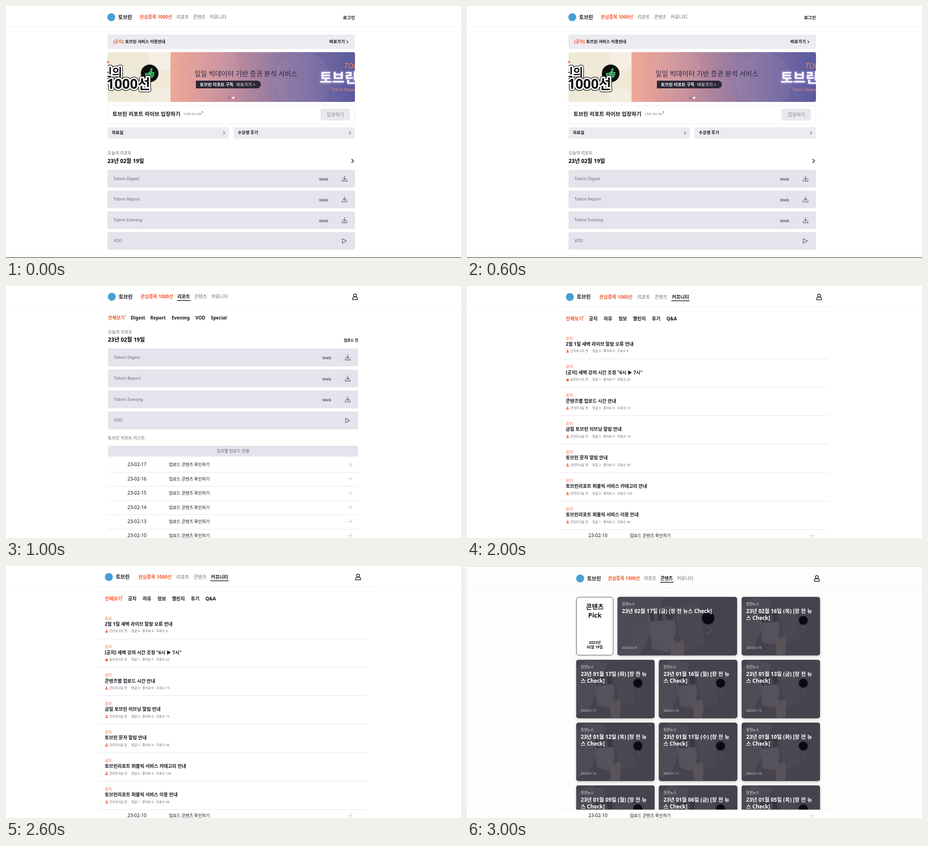
Write an HTML page that moves like this. It is 1004 by 557 pixels and loops after 4000 ms.

```html
<!DOCTYPE html>
<html lang="ko">
<head>
<meta charset="utf-8">
<title>토브린</title>
<style>
html, body { margin: 0; width: 100%; height: 100%; overflow: hidden; background: #fff; }
svg { display: block; width: 1004px; height: 557px; }
text { font-family: "Noto Sans", "Noto Sans CJK KR", "Noto Sans CJK JP", "Noto Sans CJK", sans-serif; white-space: pre; }
</style>
</head>
<body>
<svg id="stage" viewBox="0 0 1004 557" lang="ko"></svg>
<script>
const INK = '#14131e', GREY = '#6a6678', RED = '#f1592f', BAR = '#e5e4ec', PALE = '#ecebf1', RULE = '#e5e5ea';
const BRAND = '토브린', BRAND_EN = 'Tobrin';

// Text is placed by its left (or anchored) x and its vertical centre.
const text = (x, cy, str, size, color = INK, weight = 700, anchor = 'start', extra = '') =>
  `<text x="${x}" y="${(cy + size * 0.365).toFixed(2)}" font-size="${size}" fill="${color}" font-weight="${weight}" text-anchor="${anchor}" ${extra}>${str}</text>`;
const rect = (x, y, w, h, fill, r = 0, extra = '') =>
  `<rect x="${x}" y="${y}" width="${w}" height="${h}" rx="${r}" fill="${fill}" ${extra}/>`;
const circle = (x, y, r, fill, extra = '') => `<circle cx="${x}" cy="${y}" r="${r}" fill="${fill}" ${extra}/>`;
const stroke = (d, color, w = 1.2) =>
  `<path d="${d}" fill="none" stroke="${color}" stroke-width="${w}" stroke-linecap="round" stroke-linejoin="round"/>`;
const fill = (d, color, extra = '') => `<path d="${d}" fill="${color}" ${extra}/>`;
const rule = (x, y, w, color = RULE) => rect(x, y, w, 1, color);
const times = (n, fn) => Array.from({ length: n }, (_, i) => fn(i)).join('');

const chevron = (x, y, s, color = INK, w = 1.2) => stroke(`M${x} ${y - s}l${s} ${s}l${-s} ${s}`, color, w);
const download = (x, y) =>
  stroke(`M${x} ${y - 6}v8m-3.2 -3.2l3.2 3.2l3.2 -3.2M${x - 5.3} ${y + 2}v3.4h10.6v-3.4`, GREY, 1.4);
const play = (x, y) => stroke(`M${x - 4.2} ${y - 5}v10l9 -5z`, GREY, 1.4);
const arrow = (x, y) => stroke(`M${x} ${y}h9.5m-4 -4l4 4l-4 4`, '#cfcdd8', 1.1);
const person = (x, y) =>
  `<circle cx="${x}" cy="${y - 3.3}" r="3.2" fill="none" stroke="${INK}" stroke-width="1.4"/>` +
  stroke(`M${x - 5.5} ${y + 6}v-2q0 -3.6 3.6 -3.6h3.8q3.6 0 3.6 3.6v2z`, INK, 1.4);

function header(logoX, cy, xs, size, active) {
  const labels = ['관심종목 1000선', '리포트', '콘텐츠', '커뮤니티'];
  const nav = labels.map((s, i) =>
    text(xs[i], cy, s, size, i === 0 ? RED : i === active ? INK : GREY, i === 0 || i === active ? 700 : 500)).join('');
  const w = active === 3 ? 40 : 30;
  const line = active ? rect(xs[active] - 1, cy + 7.6, w, 1.5, INK) : '';
  return circle(logoX, cy, 8.8, '#479fd6') + text(logoX + 15.5, cy, BRAND, 11) + nav + line;
}

function reports(x, right, top, pitch, h, size) {
  const names = [BRAND_EN + ' Digest', BRAND_EN + ' Report', BRAND_EN + ' Evening', 'VOD'];
  return names.map((s, i) => {
    const y = top + i * pitch, mid = y + h / 2;
    const tools = i < 3
      ? text(right - 59, mid + 1, 'Web', size + 0.2, GREY, 600, 'end') +
        rect(right - 46.5, mid - 9, 1, 18, '#dbdae4') + download(right - 23, mid + 0.3)
      : play(right - 23.5, mid + 0.3);
    return rect(x, y, right - x, h, BAR, 3) + text(x + 13, mid - 0.3, s, size, GREY, 500) + tools;
  }).join('');
}

function banner() {
  const label = (x, y, s, size) => ['stroke="#111" stroke-width="9"', 'stroke="#fff" stroke-width="6.5"', '']
    .map(e => text(x, y, s, size, '#111', 900, 'start', e + ' stroke-linejoin="round"')).join('');
  return `<g clip-path="url(#banner)">` +
    rect(224, 102, 139, 110, '#efe9d8') +
    circle(345, 112, 30, '#f4efe2') + circle(340, 205, 26, '#f3eee0') +
    rect(363, 102, 407, 110, 'url(#dusk)') +
    circle(462, 142, 54, '#fff', 'opacity=".04"') + circle(655, 165, 62, '#fff', 'opacity=".04"') +
    fill('M223 119l5 5l-5 4z', RED) +
    circle(317, 149, 19.5, '#0d0f10') +
    fill('M307 148h5l5 -3l3 -8q4 0 3 4l-1 5h5q2 2 0 4q1 3 -1 4q0 3 -2 3q0 2 -3 2h-7l-2 -1h-5z', '#3fae6a') +
    stroke('M312 148v10M321 150h6M321 154h5', '#0d0f10', 0.8) +
    label(212, 146, '린의', 24) + label(222, 172.5, '1000선', 30) +
    text(416, 150, '일일 빅데이터 기반 증권 분석 서비스', 15, '#2a2640', 500) +
    fill('M419 165h135a8.5 8.5 0 0 1 0 17h-135z', '#2b2838') +
    text(428, 173.5, BRAND + ' 리포트 구독', 9.4, '#fff') +
    text(508, 173.5, '바로가기 &gt;', 9.3, '#fff', 400) +
    circle(492.5, 203, 2.1, '#77697c') + circle(501.5, 203, 2.4, '#fff') +
    text(692, 158, BRAND, 30, '#fff', 700, 'start', 'style="text-shadow:0 0 5px #d9c8ff"') +
    text(746, 132, 'TOB', 17, '#ef8058', 300, 'start', 'font-style="italic"') +
    text(718, 185, BRAND_EN + ' Report', 8.8, '#ee8c70', 400) + '</g>';
}

function home() {
  const link = (x, s) => rect(x, 268, 268, 25, PALE, 3) + text(x + 9.5, 280, s, 9.2) + chevron(x + 255.5, 280.5, 3.2, GREY);
  return rect(0, 0, 1004, 557, '#fff') + rule(0, 46, 1004, '#f1f1f3') +
    header(232.3, 24.7, [295, 376, 412.7, 449.3], 10, 0) + text(770, 25, '로그인', 9.6, INK, 700, 'end') +
    rect(224, 63, 546, 32, PALE, 3) +
    text(236.5, 79, '[공지]', 9.3, RED) + text(263, 79, BRAND + ' 서비스 이용안내', 9.1) +
    text(713.5, 79, '바로가기', 9.3) + chevron(752, 79.3, 2.6) +
    banner() +
    rect(224.5, 219.5, 545, 41.5, '#fff', 4, `stroke="${PALE}"`) +
    text(235, 238.5, BRAND + ' 리포트 라이브 입장하기', 11.75) +
    text(392, 238, 'LIVE On Air', 7.7, '#77738a', 400) + circle(433.5, 234.3, 1.1, INK) +
    rect(694, 227, 65, 26, '#e9e8ee', 3) + text(726.8, 240, '입장하기', 10.4, '#a9a6b5', 700, 'middle') +
    link(224, '자료실') + link(502, '수강생 후기') +
    text(224, 325, '오늘의 리포트', 9.2, GREY, 400) + text(224, 343, '23년 02월 19일', 12, '#000') +
    chevron(763, 342.3, 3.8, INK, 1.5) +
    reports(224, 770, 362, 45.85, 39.2, 9.1) + rect(0, 556, 1004, 1, '#111');
}

function reportPage() {
  const tabs = [['Digest', 275], ['Report', 318.5], ['Evening', 365.5], ['VOD', 418], ['Special', 452]];
  return rect(0, 0, 1004, 557, '#fff') + rule(0, 45, 1004, '#f1f1f3') +
    header(233.5, 23.7, [296.7, 378.3, 415.7, 453], 10.1, 1) + person(770.3, 24) +
    text(225, 70.5, '전체보기', 10, RED) + circle(263.3, 65.6, 1.1, RED) +
    tabs.map(([s, x]) => text(x, 70.5, s, 10)).join('') +
    text(225, 101.7, '오늘의 리포트', 9.3, GREY, 400) + text(225, 118.3, '23년 02월 19일', 12.15, '#000') +
    text(777, 120.3, '업로드 전', 8, INK, 700, 'end') +
    reports(225, 777, 138, 46.4, 39.7, 9.2) +
    text(225, 336, BRAND + ' 리포트 리스트', 9.25, GREY, 500) +
    rect(225, 353, 552, 24, BAR, 3) + text(501, 365, '일자별 업로드 현황', 9.2, GREY, 500, 'middle') +
    [17, 16, 15, 14, 13, 10].map((d, i) => {
      const y = 395 + i * 31.4;
      return text(268, y - 0.3, '23-02-' + d, 10.3, INK, 500) + text(359.5, y, '업로드 콘텐츠 확인하기', 9.25, INK, 500) +
        arrow(754, y) + rule(225, Math.round(y + 15.9), 552);
    }).join('');
}

function community() {
  const tabs = [['공지', 269], ['자유', 301.5], ['정보', 334], ['챌린지', 366], ['후기', 407.7], ['Q&amp;A', 440]];
  const posts = [
    ['2월 1일 새벽 라이브 알람 오류 안내', '2주', 0, 0, 8],
    ['[공지] 새벽 강의 시간 조정 "6시 ▶ 7시"', '3주', 1, 7, 22],
    ['콘텐츠별 업로드 시간 안내', '2달', 0, 0, 15],
    [`금일 ${BRAND} 이브닝 알림 안내`, '2달', 0, 0, 10],
    [`${BRAND} 문자 알림 안내`, '4달', 2, 0, 56],
    [`${BRAND}리포트 퍼블릭 서비스 카테고리 안내`, '5달', 0, 2, 120],
    [`${BRAND}리포트 퍼블릭 서비스 이용 안내`, '5달', 1, 2, 96]
  ];
  const badge = (y, vip) => vip
    ? fill(`M219 ${y - 1.5}l1.6 .8l1.4 -2.3l1.4 2.3l1.6 -.8l-.7 5h-4.6z`, RED)
    : circle(222, y - 1.6, 1.6, RED) + fill(`M219 ${y + 3.2}q0 -2.8 3 -2.8t3 2.8z`, RED);
  return rect(205, 15, 592, 524, '#fff') + rule(205, 46, 592, '#f1f1f3') +
    header(227, 24.3, [291.7, 375.7, 414, 452], 10.3, 3) + person(777, 24.5) +
    text(218, 72.5, '전체보기', 10.4, RED) + circle(257.3, 66.8, 1.1, RED) +
    tabs.map(([s, x]) => text(x, 72.5, s, 10.4)).join('') +
    posts.map(([title, age, notes, likes, views], i) => {
      const y = 115.5 + i * 62.95, meta = y + 28.2;
      return text(218, y, '공지', 8.3, RED, 400) + text(218, y + 12.4, title, 10.2) + badge(meta, i === 1) +
        text(228, meta, `${i === 1 ? '달무린' : '관리자'}·${age} 전`, 6.9, GREY, 400) +
        text(276.5, meta, `댓글 ${notes} · 좋아요 ${likes} · 조회수 ${views}`, 7, GREY, 400) +
        rule(205, Math.min(538, Math.round(y + 45)), 592);
    }).join('');
}

// Dimmed desk scene, centred on 0,0.
const desk = () =>
  rect(-96, -65, 192, 130, '#45434d') +
  fill('M-96 -40L-62 -65L-20 -56L-34 -12L-60 48L-96 60z', '#4d4b55') +
  fill('M-49 -28L-8 -32L-2 10L-14 42L-40 36z', '#53515b') +
  fill('M-4 -32L34 -40L44 30L10 40z', '#4a4852') +
  fill('M-46 -26L-8 -29L-6 -11L-42 -7z', '#393741') +
  fill('M-38 -24l6 -1l1 16l-6 1zM-24 -26l5 0l2 16l-6 1z', '#4b4953') +
  times(9, i => stroke(`M${-38 + i * 0.8} ${-2 + i * 4}l28 -3`, '#5c5a64', 0.8)) +
  times(9, i => stroke(`M${-62 - i * 2} ${2 + i * 5}l18 3`, '#575560', 0.8)) +
  times(6, i => stroke(`M4 ${-24 + i * 7}l26 -4`, '#504e58', 0.7)) +
  fill('M-9 65L-12 36Q-14 24 -8 21L0 27L8 22Q14 34 9 65z', '#5a545a') +
  stroke('M-6 24l3 10M1 26l1 9', '#4b464e', 0.8) +
  stroke('M49 0q7 3 3 9q-3 3 -6 1', '#57555f', 1.4) +
  circle(49.5, -12.9, 11, '#3a3842') + circle(49.5, -12.9, 9.7, '#0b0914');

function card(x, y, w, month, day, dow) {
  const h = 129, wide = w > 200, id = `c${Math.round(x)}_${Math.round(y)}`;
  const head = `23년 ${month}월 ${day}일 (${dow}) [장 전 뉴`;
  return `<clipPath id="${id}">${rect(x, y, w, h, '#000', 5)}</clipPath>` +
    rect(x, y, w, h, '#45434d', 5, 'style="filter:drop-shadow(0 2px 3px rgba(0,0,0,.22))"') +
    `<g clip-path="url(#${id})"><g transform="translate(${x + w / 2} ${y + h / 2}) scale(${wide ? 1.38 : 1})">${desk()}</g></g>` +
    text(x + 10, y + 16, '장전뉴스', 7.8, '#e6e6ec', 400) +
    text(x + 10, y + 31.3, head + (wide ? '스 Check]' : ''), 11.7, '#fff', 600) +
    (wide ? '' : text(x + 10, y + 46.3, '스 Check]', 11.7, '#fff', 600)) +
    text(x + 10, y + 112.5, `2023.${month}.${day}.`, 6.6, '#d8d8df', 400);
}

function contents() {
  const days = ['17화', '16월', '13금', '12목', '11수', '10화', '09월', '06금', '05목'];
  return `<g clip-path="url(#fold)">` + rect(0, 0, 1004, 539, '#fdfdfd') + rule(0, 0, 1004, '#cfcfd2') + rule(0, 48, 1004, '#f0f0f2') +
    header(249.7, 27.5, [311, 390.7, 427, 463.3], 9.85, 2) + person(772, 27.8) +
    rect(241.5, 69, 81, 128, '#fff', 5, 'stroke="#55535f" style="filter:drop-shadow(0 1px 2px rgba(0,0,0,.15))"') +
    text(282, 90, '콘텐츠', 14.2, INK, 700, 'middle') + text(282, 109, 'Pick', 14.4, INK, 700, 'middle') +
    text(282, 169.3, '2023년', 8.1, INK, 700, 'middle') + text(282, 179.3, '02월 19일', 8, INK, 700, 'middle') +
    card(332, 68.5, 264, '02', 17, '금') + card(606, 68.5, 173, '02', 16, '목') +
    days.map((d, i) => card(241 + (i % 3) * 182.5, 207.4 + Math.floor(i / 3) * 138.8, 173, '01', d.slice(0, 2), d[2])).join('') +
    '</g>' + rule(205, 538.5, 592, '#efeff2');
}

const defs = `<defs><linearGradient id="dusk">
  <stop offset="0" stop-color="#f1a898"/><stop offset=".3" stop-color="#c68f9c"/>
  <stop offset=".6" stop-color="#8e77a2"/><stop offset="1" stop-color="#5a5a9f"/></linearGradient>
  <clipPath id="banner">${rect(224, 102, 546, 110, '#000', 4)}</clipPath>
  <clipPath id="fold">${rect(0, 0, 1004, 539, '#000')}</clipPath></defs>`;

const stage = document.getElementById('stage');
stage.innerHTML = defs + [home, reportPage, community, contents].map(page => `<g class="page">${page()}</g>`).join('');
const pages = stage.querySelectorAll('.page');

// The report page stays beneath the two pages that follow it.
function draw(ms) {
  const now = Math.floor((ms % 4000) / 1000);
  pages.forEach((g, i) => {
    g.style.display = i === now || (i === 1 && now > 1) ? '' : 'none';
  });
}

const start = performance.now();
function tick() {
  draw(performance.now() - start);
  requestAnimationFrame(tick);
}
tick();
</script>
</body>
</html>
```
